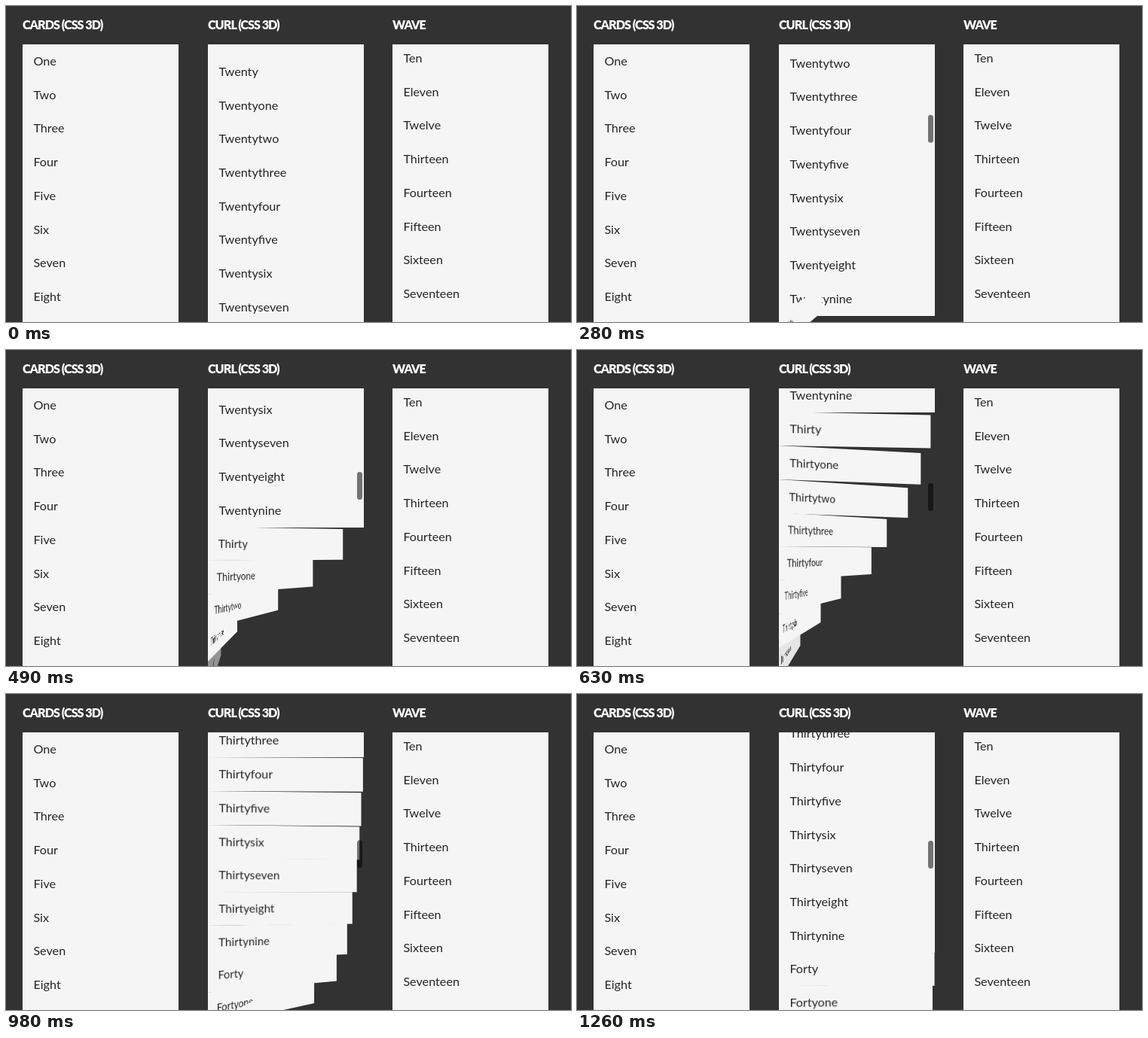
An HTML page that plays this animation: 750 px wide and 420 px high, repeating every 1.33 s.

```html
<!DOCTYPE html>
<html lang="en">
<head>
<meta charset="utf-8">
<title>Scrolling lists</title>
<style>
  html, body { margin: 0; width: 100%; height: 100%; overflow: hidden; background: #323232; }
  #stage { position: relative; width: 750px; height: 420px; overflow: hidden; font: 16.2px Lato, sans-serif; }
  h2 {
    position: absolute; top: 13px; margin: 0; white-space: nowrap;
    font-size: 16.2px; font-weight: 900; line-height: 24px; letter-spacing: -1px; color: #fff;
  }
  .list {
    position: absolute; top: 51px; width: 207px; height: 432px; overflow: hidden;
    perspective: 540px; perspective-origin: 0 50%;
  }
  .row {
    position: absolute; left: 0; top: 0; box-sizing: border-box; width: 207px; height: 45px;
    padding-left: 14.4px; line-height: 44px; white-space: nowrap;
    color: #252525; background: #f5f5f5; transform-origin: 0 50%;
  }
  #bar {
    position: absolute; left: 466px; top: 0; width: 7px; height: 37px;
    border-radius: 3.5px; background: rgba(0, 0, 0, .53);
  }
</style>
</head>
<body>
<div id="stage"></div>
<script>
const STEP = 70, LOOP = 1330, PITCH = 44.7, TURN = 620, FADE = 75;
const stage = document.getElementById('stage');

const SMALL = ('Zero One Two Three Four Five Six Seven Eight Nine Ten Eleven Twelve Thirteen ' +
  'Fourteen Fifteen Sixteen Seventeen Eighteen Nineteen').split(' ');
const TENS = ['', '', 'Twenty', 'Thirty', 'Forty'];

function numberName(n) {
  if (n < 20) return SMALL[n];
  return TENS[Math.floor(n / 10)] + (n % 10 ? SMALL[n % 10].toLowerCase() : '');
}

function add(parent, tag, className, text = '') {
  const el = document.createElement(tag);
  el.className = className;
  el.textContent = text;
  parent.appendChild(el);
  return el;
}

function addList(title, x, first, last) {
  add(stage, 'h2', '', title).style.left = x + 'px';
  const list = add(stage, 'div', 'list');
  list.style.left = x + 'px';
  const rows = [];
  for (let n = first; n <= last; n++) {
    rows.push({ n, el: add(list, 'div', 'row', numberName(n)) });
  }
  return rows;
}

function place(rows, scroll) {
  for (const { n, el } of rows) {
    el.style.transform = `translateY(${Math.round((n - 1) * PITCH - scroll)}px)`;
  }
}

place(addList('CARDS (CSS 3D)', 22, 1, 9), 0);
const curl = addList('CURL (CSS 3D)', 268, 19, 42);
place(addList('WAVE', 513, 10, 18), 9 * PITCH + 4);
const bar = add(stage, 'div', '');
bar.id = 'bar';

// Time, scroll offset, speed in px per ms
const SCROLL = [
  [0, 835.5, .1], [280, 936, .55], [490, 1112, 1.12], [630, 1265, 1.05],
  [840, 1407.4, .4], [980, 1442, .1], [1260, 1451, 0]
];

function scrollAt(t) {
  let i = 0;
  while (i < SCROLL.length - 2 && t > SCROLL[i + 1][0]) i++;
  const [t0, p0, v0] = SCROLL[i], [t1, p1, v1] = SCROLL[i + 1];
  const d = t1 - t0, u = (t - t0) / d, w = 1 - u;
  return p0 * w * w * (1 + 2 * u) + p1 * u * u * (3 - 2 * u) + d * u * w * (v0 * w - v1 * u);
}

// When each row from Thirty on starts to unfold
const FIRST_CURLED = 30;
const STARTS = [170, 270, 337, 403, 437, 490, 522, 558, 601, 637, 688, 757, 847];

// cubic-bezier(.25, .1, .25, 1)
function ease(x) {
  if (x >= 1) return 1;
  let lo = 0, hi = 1, u = .5;
  for (let i = 0; i < 24; i++) {
    u = (lo + hi) / 2;
    if (.75 * u * (1 - u) + u ** 3 < x) lo = u; else hi = u;
  }
  return .3 * u * (1 - u) ** 2 + 3 * u * u * (1 - u) + u ** 3;
}

function draw(t) {
  const scroll = scrollAt(t);
  place(curl, scroll);
  for (const { n, el } of curl) {
    if (n < FIRST_CURLED) continue;
    const age = t - STARTS[n - FIRST_CURLED];
    el.style.display = age > 0 ? '' : 'none';
    if (age <= 0) continue;
    const angle = 90 * (1 - ease(age / TURN));
    el.style.transform += ` rotateY(${angle.toFixed(3)}deg)`;
    el.style.opacity = Math.min(1, (age / FADE) ** 2);
  }
  bar.style.display = t > 0 ? '' : 'none';
  bar.style.transform = `translateY(${53.3 + .0977 * scroll}px)`;
}

function tick() {
  const t = performance.now() % LOOP;
  draw(Math.floor(t / STEP) * STEP);
  requestAnimationFrame(tick);
}
tick();
</script>
</body>
</html>
```
